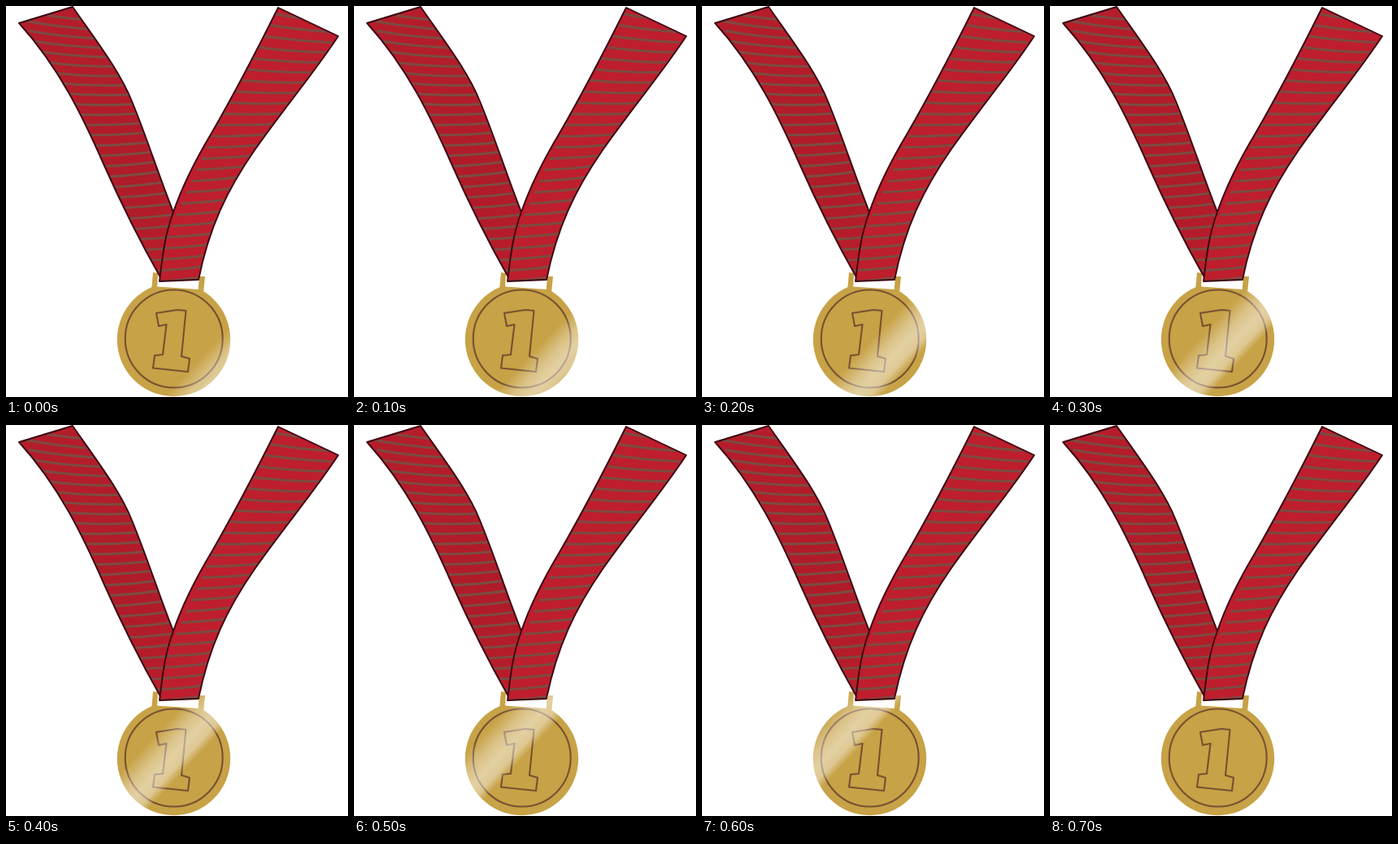
An HTML page for the animation above (0.8 s loop, 421 by 480 pixels).

```html
<!DOCTYPE html>
<html lang="en">
<head>
<meta charset="utf-8">
<title>Medal</title>
<style>
  html, body { margin: 0; width: 100%; height: 100%; overflow: hidden; background: #fff; }
  svg { display: block; }
  .edge { fill: none; stroke: #3b0410; stroke-width: 1.9; stroke-linejoin: round; }
  .stripe { fill: none; stroke: #7c4b42; stroke-width: 3; }
  .line { fill: none; stroke: #775130; stroke-width: 2.1; stroke-linejoin: round; }
</style>
</head>
<body>
<svg width="421" height="480" viewBox="0 0 421 480">
  <defs>
    <path id="left" d="M16 21 L82 1 C112 44 140 80 155 117 C174 163 188 208 206 253 L190 333 C165 289 142 243 121 196 C95 137 66 76 16 21 Z"/>
    <path id="right" d="M335 2 L409 37 C380 81 342 126 306 177 C272 226 250 272 237 336 L189 338 C193 303 196 280 206 253 C218 218 235 186 253 156 C282 106 309 54 335 2 Z"/>
    <circle id="disc" cx="206.5" cy="409.5" r="69.7"/>
    <path id="tabs" d="M181 327 L187 328 L186 347 L179 349 Z M238 332 L245 332 L243 352 L236.5 350 Z"/>
    <clipPath id="clipLeft"><use href="#left"/></clipPath>
    <clipPath id="clipRight"><use href="#right"/></clipPath>
    <clipPath id="clipGold"><use href="#disc"/><use href="#tabs"/></clipPath>
    <linearGradient id="cloth" gradientUnits="userSpaceOnUse" x1="40" y1="0" x2="190" y2="330">
      <stop stop-color="#b61d2b"/>
      <stop offset=".7" stop-color="#b01b29"/>
      <stop offset="1" stop-color="#ba1d2b"/>
    </linearGradient>
    <linearGradient id="shine" x2="1" y2="0">
      <stop stop-color="#fff" stop-opacity="0"/>
      <stop offset=".35" stop-color="#fff" stop-opacity=".36"/>
      <stop offset=".6" stop-color="#fff" stop-opacity=".5"/>
      <stop offset=".82" stop-color="#fff" stop-opacity=".42"/>
      <stop offset="1" stop-color="#fff" stop-opacity="0"/>
    </linearGradient>
  </defs>

  <use href="#disc" fill="#c7a246"/>
  <path fill="#fff" d="M186 334 H239 L238 348 L186 344.5 Z"/>
  <use href="#tabs" fill="#c7a246"/>

  <use href="#left" fill="url(#cloth)"/>
  <g clip-path="url(#clipLeft)"><path id="stripesLeft" class="stripe"/></g>
  <use href="#left" class="edge"/>
  <use href="#right" fill="#be1e2d"/>
  <g clip-path="url(#clipRight)"><path id="stripesRight" class="stripe"/></g>
  <use href="#right" class="edge"/>

  <circle class="line" cx="206.7" cy="408.5" r="60"/>
  <path class="line" d="M185 377 L211 373 L221.5 374 L216 430 L226 433 L224 449 L181 444.5 L183 429 L193 428 L197.5 391 L188 393 Z"/>
  <g clip-path="url(#clipGold)">
    <g transform="translate(207 411) rotate(43)">
      <rect id="glint" y="-90" width="56" height="180" fill="url(#shine)"/>
    </g>
  </g>
</svg>
<script>
  const $ = id => document.getElementById(id);

  // Stripes tilt down at the top of a ribbon and up at its lower end.
  function stripes(y0, gap, count, leftX, width) {
    let d = '';
    for (let i = 0; i < count; i++) {
      const y = y0 + i * gap;
      const x = leftX(y);
      const tilt = Math.max(-10, 13 - y * 0.11);
      d += `M${x} ${y}q${width / 2} ${tilt / 2 + 3} ${width} ${tilt}`;
    }
    return d;
  }
  $('stripesLeft').setAttribute('d', stripes(4.9, 12.8, 27, y => 12 + y * 0.53, 88));
  $('stripesRight').setAttribute('d', stripes(-5.8, 13.8, 27, y => 325 - y * 0.45, 92));

  const STEP = 100, STEPS = 8;
  function draw(now) {
    const k = Math.floor(now / STEP) % STEPS;
    $('glint').setAttribute('x', 38 - 19 * k);
    $('glint').style.display = k === STEPS - 1 ? 'none' : '';
    requestAnimationFrame(draw);
  }
  draw(0);
</script>
</body>
</html>
```
